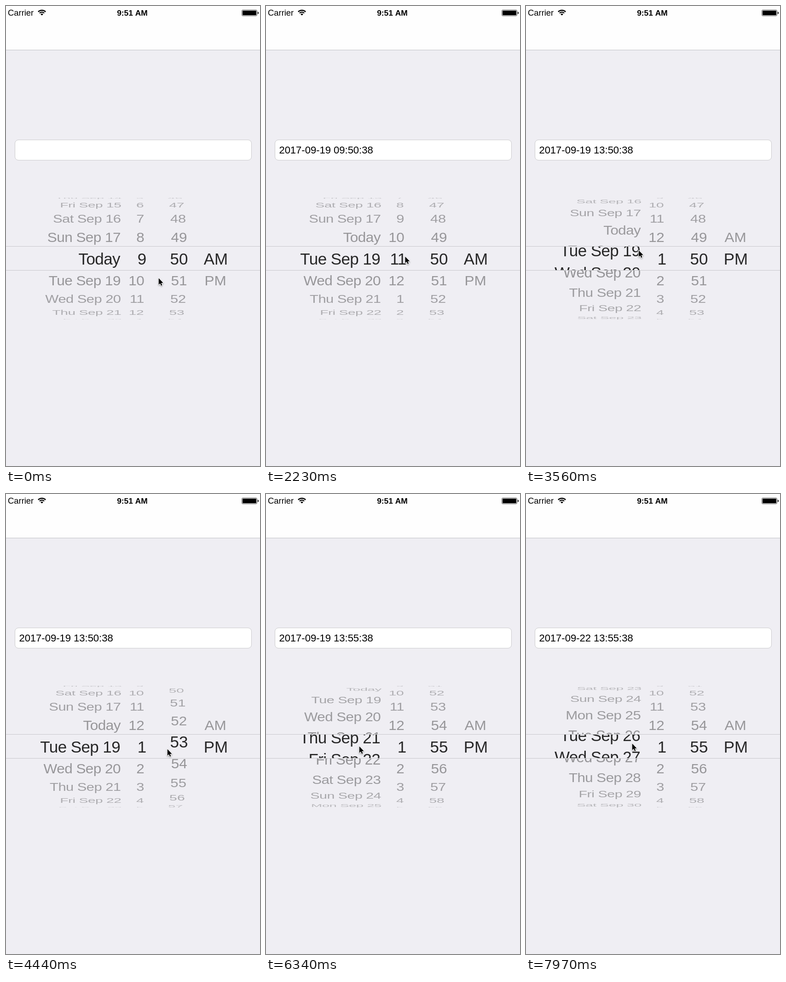
These frames come from a looping animation (552 px wide and 998 px high, 8 s). An HTML page with a canvas:

```html
<!DOCTYPE html>
<html lang="en">
<head>
<meta charset="utf-8">
<title>Date picker</title>
<style>
  html, body { margin: 0; width: 100%; height: 100%; overflow: hidden; background: #efeef3; }
  canvas { display: block; width: 552px; height: 998px; }
</style>
</head>
<body>
<canvas id="stage" width="552" height="998"></canvas>
<script>
const ctx = document.getElementById('stage').getContext('2d');
const W = 552, H = 998, LOOP = 8000;
const FONT = '"Liberation Sans", Arial, sans-serif';

// Wheel geometry
const CY = 548.4, RADIUS = 133, STEP = 20.5 * Math.PI / 180, REACH = 4.38;
const TOP = 416, BAND_TOP = 522, BAND_BOTTOM = 573, BOTTOM = 680;
const DAYS = ['Thu', 'Fri', 'Sat', 'Sun', 'Mon', 'Tue', 'Wed'];

// The picture advances in ticks of about 147 ms after a short rest
const tickAt = t => t < 450 ? -1 : Math.floor((t - 450) / 147.5 + 0.1);

// Eased progress from tick a to tick b
function ease(k, a, b) {
  const u = Math.min(1, Math.max(0, (k - a) / (b - a)));
  return u * u * (3 - 2 * u);
}

// Each scroll is a sum of eased drags: from tick, to tick, rows
const scroll = (k, start, ...drags) =>
  drags.reduce((sum, [a, b, rows]) => sum + rows * ease(k, a, b), start);

const columns = [
  { align: 'right', big: 248, small: 249,
    pos: k => scroll(k, 18, [2, 6, 1], [18, 20, 0.5], [20, 23, -0.5], [36, 41.55, 3], [46, 52, 4.89]),
    label: d => d === 18 ? 'Today' : DAYS[d % 7] + ' Sep ' + d },
  { align: 'right', big: 304.7, small: 300.3,
    pos: k => scroll(k, 9, [9, 15, 4]),
    label: h => String((h + 11) % 12 + 1) },
  { align: 'center', big: 376, small: 376,
    pos: k => scroll(k, 50, [24, 29, 5]),
    label: m => String(m % 60).padStart(2, '0') },
  { align: 'center', big: 456, small: 455,
    pos: k => scroll(k, 0, [12, 15, 1]),
    label: i => ['AM', 'PM'][i] || '' }
];

// Resting points of the pointer: tick, x, y
const stops = [
  [-1, 331, 590], [2, 228, 584], [7, 215, 547], [9, 290, 595], [14, 308, 515],
  [17, 225, 542], [20, 225, 517], [24, 348, 598], [27, 350, 553],
  [36, 212, 590], [40, 202, 547], [46, 207, 560], [51, 230, 541]
];

function pointerAt(k) {
  const i = Math.max(1, stops.findIndex(s => s[0] >= k));
  const [a, ax, ay] = stops[i - 1], [b, bx, by] = stops[i];
  const f = ease(k, a, b);
  return [ax + (bx - ax) * f, ay + (by - ay) * f];
}

function clipTo(top, bottom, draw) {
  ctx.save();
  ctx.beginPath();
  ctx.rect(0, top, W, bottom - top);
  ctx.clip();
  draw();
  ctx.restore();
}

function drawColumn(col, k, magnified) {
  const pos = col.pos(k), reach = magnified ? 1 : REACH;
  ctx.font = '35px ' + FONT;
  ctx.textAlign = col.align;
  ctx.letterSpacing = col.align === 'right' ? '-0.6px' : '0px';
  for (let i = Math.ceil(pos - reach); i <= pos + reach; i++) {
    const angle = (i - pos) * STEP, cos = Math.cos(angle);
    const depth = magnified ? 1 : 0.9 + 0.107 * cos;
    const size = magnified ? 1 : 0.9 * depth;
    const x = magnified ? col.big : W / 2 + (col.small - W / 2) * depth;
    const alpha = magnified ? 0.84 : 0.38 * (0.25 + 0.75 * Math.pow(cos, 0.7));
    ctx.save();
    ctx.translate(x, CY + RADIUS * Math.sin(angle));
    ctx.scale(size, size * cos);
    ctx.fillStyle = `rgba(0,0,0,${alpha})`;
    ctx.fillText(col.label(i), 0, 12.6);
    ctx.restore();
  }
  ctx.letterSpacing = '0px';
}

function drawWheels(k) {
  const layer = magnified => () => columns.forEach(c => drawColumn(c, k, magnified));
  clipTo(TOP, BAND_TOP, layer(false));
  clipTo(BAND_BOTTOM, BOTTOM, layer(false));
  clipTo(BAND_TOP, BAND_BOTTOM, layer(true));
  ctx.fillStyle = '#c8c8cc';
  ctx.fillRect(0, BAND_TOP - 1, W, 1);
  ctx.fillRect(0, BAND_BOTTOM, W, 1);
}

function text(str, x, y, font, align) {
  ctx.font = font + ' ' + FONT;
  ctx.textAlign = align;
  ctx.fillStyle = '#000';
  ctx.fillText(str, x, y);
}

function drawWifi(x, y) {
  const from = -Math.PI * 0.75, to = -Math.PI * 0.25;
  ctx.strokeStyle = ctx.fillStyle = '#000';
  ctx.lineWidth = 2.4;
  for (const r of [7.2, 11.4]) {
    ctx.beginPath();
    ctx.arc(x, y, r, from, to);
    ctx.stroke();
  }
  ctx.beginPath();
  ctx.moveTo(x, y);
  ctx.arc(x, y, 4.2, from, to);
  ctx.fill();
}

function roundRect(x, y, w, h, r) {
  ctx.beginPath();
  ctx.roundRect(x, y, w, h, r);
}

function drawBattery() {
  ctx.strokeStyle = '#555';
  ctx.fillStyle = '#000';
  ctx.lineWidth = 1;
  roundRect(512.5, 8.5, 33, 13, 2.5);
  ctx.stroke();
  roundRect(514, 10, 30, 10, 1.2);
  ctx.fill();
  roundRect(547, 12.5, 2, 5, [0, 2, 2, 0]);
  ctx.fill();
}

function drawBars() {
  ctx.fillStyle = '#fefefe';
  ctx.fillRect(0, 0, W, 95);
  ctx.fillStyle = '#bfbfc3';
  ctx.fillRect(0, 95, W, 1);
  text('Carrier', 4, 21, '18.4px', 'left');
  text('9:51 AM', 274.5, 21, 'bold 17.4px', 'center');
  drawWifi(78, 20.6);
  drawBattery();
}

function drawField(k) {
  roundRect(19.5, 290.5, 514, 44, 7.5);
  ctx.fillStyle = '#fff';
  ctx.fill();
  ctx.strokeStyle = '#cbcbcd';
  ctx.lineWidth = 1;
  ctx.stroke();
  if (k < 6) return;
  const day = k < 44 ? 19 : 22;
  const time = k < 16 ? '09:50' : k < 31 ? '13:50' : '13:55';
  text(`2017-09-${day} ${time}:38`, 28.4, 319.6, '22px', 'left');
}

function drawPointer(k) {
  const [x, y] = pointerAt(k);
  ctx.save();
  ctx.translate(x + 0.8, y + 0.5);
  ctx.lineJoin = 'round';
  ctx.lineWidth = 2;
  ctx.strokeStyle = '#fff';
  ctx.fillStyle = '#000';
  const arrow = new Path2D('M0 0V14.2L3.2 11.2L5.4 16.2L7.6 15.2L5.5 10.4L9.8 10.2Z');
  ctx.shadowColor = 'rgba(0,0,0,.35)';
  ctx.shadowBlur = 3;
  ctx.shadowOffsetY = 1.5;
  ctx.stroke(arrow);
  ctx.shadowColor = 'transparent';
  ctx.fill(arrow);
  ctx.restore();
}

function render(t) {
  const k = tickAt(t);
  ctx.fillStyle = '#efeef3';
  ctx.fillRect(0, 0, W, H);
  drawBars();
  drawField(k);
  drawWheels(k);
  drawPointer(k);
}

const start = performance.now();
function loop() {
  render((performance.now() - start) % LOOP);
  requestAnimationFrame(loop);
}
loop();
</script>
</body>
</html>
```
